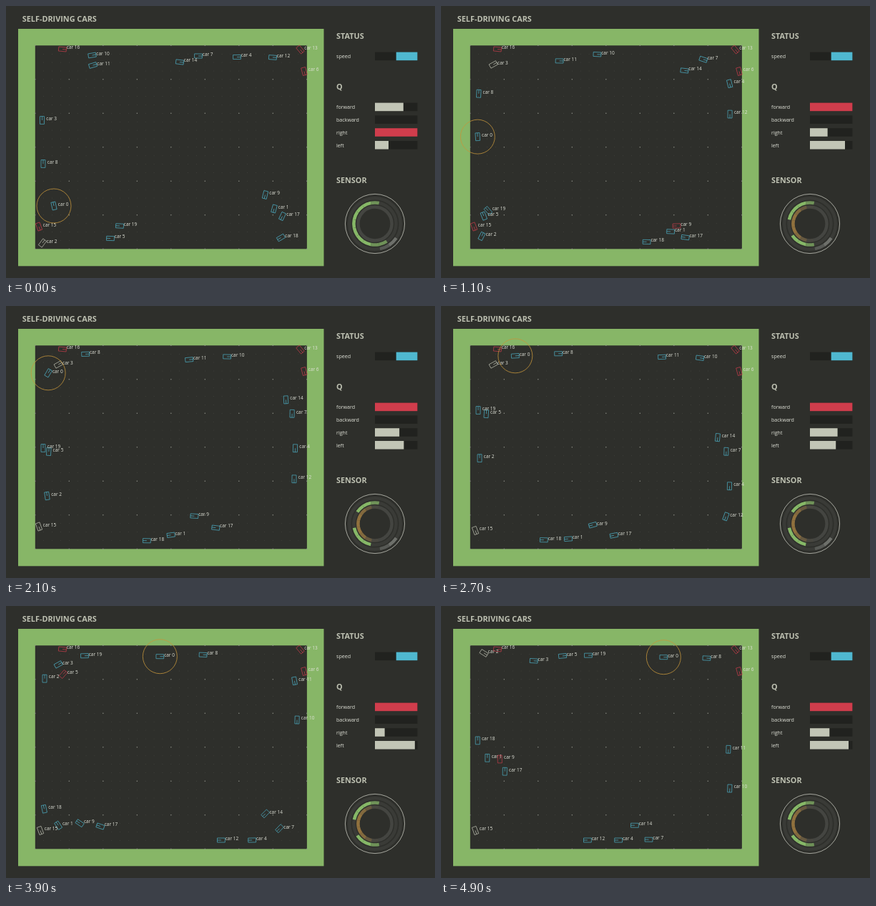
These frames come from a looping animation (600x381 px, 5000 ms). An HTML page:

```html
<!DOCTYPE html>
<html lang="en">
<head>
<meta charset="utf-8">
<title>Self-driving cars</title>
<style>
  html, body { margin: 0; width: 100%; height: 100%; overflow: hidden; background: #2e2f2b; }
  svg { display: block; width: 100vw; height: 100vh; font-family: "Open Sans", "Noto Sans", sans-serif; }
  .head { font-size: 10.85px; font-weight: 700; fill: #bdc0b1; }
  .item { font-size: 7.1px; fill: #e0e2d8; }
  .tag { font-size: 6.5px; fill: #e0e2d8; }
  .car { fill: none; stroke-width: .65; }
</style>
</head>
<body>
<svg viewBox="0 0 600 381">
  <defs id="routes"></defs>
  <rect width="600" height="381" fill="#2e2f2b"/>
  <rect x="17" y="32" width="427.5" height="332.3" fill="#87b667"/>
  <rect x="40.8" y="55.3" width="380.1" height="285" fill="#2e2f2b"/>
  <g id="dots"></g>
  <g id="cars"></g>
  <circle id="focus" r="24" fill="none" stroke="#c4953c" stroke-width=".8"/>
  <g class="head">
    <text x="22.8" y="22">SELF-DRIVING CARS</text>
    <text x="462" y="46">STATUS</text>
    <text x="462" y="117.2">Q</text>
    <text x="462" y="247.6">SENSOR</text>
  </g>
  <g id="bars"></g>
  <g id="sensor" transform="translate(516 305)" fill="none">
    <circle r="41.6" stroke="#c4c6bb" stroke-width=".8"/>
  </g>
</svg>
<script>
const $ = id => document.getElementById(id);
const CYAN = '#4fb8d0', RED = '#d03d4c', WHITE = '#c2c5b6';
const STEP = 100, TICKS = 50, TURN = 60;

function add(parent, tag, attrs, text) {
  const el = document.createElementNS('http://www.w3.org/2000/svg', tag);
  for (const a in attrs) el.setAttribute(a, attrs[a]);
  if (text) el.textContent = text;
  return parent.appendChild(el);
}

// Values at a few ticks, linear in between
const keys = [0, 7, 15, 27, 34, 39, 49];
function at(values, tick) {
  let i = 0;
  while (i < keys.length - 2 && tick >= keys[i + 1]) i++;
  return values[i] + (values[i + 1] - values[i]) * (tick - keys[i]) / (keys[i + 1] - keys[i]);
}
const road = tick => at([0, 60.5, 136, 242, 308, 353.5, 449.5], tick);
const within = (spans, tick) => spans.some((from, i) => i % 2 === 0 && tick >= from && tick < spans[i + 1]);

// Floor grid
for (let i = 0; i <= 32; i++) for (let j = 0; j <= 24; j++) {
  const major = i % 4 === 0 && j % 4 === 0;
  if (!major && (i % 32 === 0 || j % 24 === 0)) continue;
  add($('dots'), 'circle', {
    cx: 40.8 + i * 11.875, cy: 55.3 + j * 11.875,
    r: major ? .75 : .45, fill: major ? '#8f9188' : '#50514b'
  });
}

// Polyline with rounded corners
function rounded(pts) {
  const toward = (p, q, d) => {
    const k = d / Math.hypot(q[0] - p[0], q[1] - p[1]);
    return [p[0] + (q[0] - p[0]) * k, p[1] + (q[1] - p[1]) * k];
  };
  const end = pts.length - 1;
  let d = 'M' + pts[0];
  for (let i = 1; i < end; i++) {
    const room = (j, free) => Math.hypot(pts[j][0] - pts[i][0], pts[j][1] - pts[i][1]) / (free ? 1 : 2);
    const r = Math.min(TURN, room(i - 1, i === 1), room(i + 1, i + 1 === end));
    d += `L${toward(pts[i], pts[i - 1], r)}Q${pts[i]} ${toward(pts[i], pts[i + 1], r)}`;
  }
  return d + 'L' + pts[end];
}

// Every car covers the same road; a stalled one loses the distance of its stall
const cars = [];
function drive(route, { stall = [0, 0], red = [], white = [] } = {}) {
  const path = add($('routes'), 'path', { d: rounded(route.split(' ').map(p => p.split(',').map(Number))) });
  const g = add($('cars'), 'g', {});
  const body = add(g, 'path', { class: 'car', d: 'M-5.4-3H5.4V3H-5.4zM0 0H5.4' });
  const tag = add(g, 'text', { class: 'tag' }, 'car ' + cars.length);
  cars.push({ path, length: path.getTotalLength(), body, tag, stall, red, white });
}
const always = [0, TICKS];
const wreck = { stall: always, red: always };

drive('67,280 49,200 52,69 340,72');
drive('375,284 366,318 280,314 178,328 64,328 65,190', { stall: [7, 10], red: [5, 10] });
drive('51,332 66,312 54,250 54,62 60,66', { stall: [1.3, 14.5], white: [0, 4, 44, 50], red: [4, 11] });
drive('50.5,160 50,72 150,78', { stall: [9.7, 43], white: [10, 31], red: [31, 36] });
drive('323,71.5 407,71 402,328 230,328');
drive('146,325.5 52,322 68,80 190,68', { stall: [32.8, 38.5], red: [32, 42] });
drive('417,91.5 419,99', { stall: always, red: [0, 32, 36, 50] });
drive('269,70 402,72 396,328 270,327');
drive('52,221 53,68 230,66 390,74');
drive('362.5,264.5 352,308 304,308 262,290 190,315 84,312 82,200', { stall: [7, 13.4], red: [5, 12, 46, 50] });
drive('120.5,69 150,64 260,70 410,73 403,280');
drive('121.5,83 149,75 205,80 310,70 406,72 401,230', { stall: [3.1, 9.1] });
drive('373,72 405,74 402,328 190,328');
drive('411.5,61 416.5,67', wreck);
drive('243,78.5 303,86 396,97 374,308 240,307', { stall: [16, 18] });
drive('46,309 48,314.5', { stall: [0, 21], red: [0, 21], white: [21, 50] });
drive('79,60.5 90,61.5', wreck);
drive('386.5,294.5 372,326 331,324 288,306 230,327 88,302 90,190', { stall: [7, 15.3] });
drive('384.5,324.5 372,332 52,326 51,150', { red: [5, 11] });
drive('159,308 52,302 52,70 240,69', { red: [13, 18, 32, 37] });

// Status and Q bars
function bar(name, y) {
  add($('bars'), 'text', { class: 'item', x: 462, y: y + 8.5 }, name);
  add($('bars'), 'rect', { x: 516, y, width: 59.4, height: 11.6, fill: '#21221f' });
  return add($('bars'), 'rect', { x: 516, y, width: 0, height: 11.6, fill: CYAN });
}
const speed = bar('speed', 64.6);
speed.setAttribute('x', 545.7);
speed.setAttribute('width', 29.7);
const [forward, , right, left] = ['forward', 'backward', 'right', 'left'].map((n, i) => bar(n, 135.6 + i * 17.8));
const RANDOM_MOVE = 15;

function drawScores(tick) {
  const q = [
    at([.67, 1, 1, 1, 1, 1, 1], tick),
    at([1, .33, .5, .65, .97, .23, .46], tick),
    at([.32, .9, .75, .61, .06, .94, .91], tick)
  ];
  const top = Math.max(...q);
  [forward, right, left].forEach((el, k) => {
    el.setAttribute('width', tick === RANDOM_MOVE ? 0 : 59.4 * q[k] / top);
    el.setAttribute('fill', q[k] === top ? RED : WHITE);
  });
}

// Sensor: sixteen sectors for traffic, walls and near walls
const point = (r, a) => `${r * Math.cos(a)} ${r * Math.sin(a)}`;
function ring(r, track, ink) {
  add($('sensor'), 'circle', { r, stroke: track, 'stroke-width': 4.5 });
  return Array.from({ length: 16 }, (_, k) => {
    const a = (k - .5) * Math.PI / 8, b = a + Math.PI / 8;
    return add($('sensor'), 'path', {
      d: `M${point(r, a)}A${r} ${r} 0 0 1 ${point(r, b)}`, stroke: ink, 'stroke-width': 4.5
    });
  });
}
const traffic = ring(35.8, '#3a3b37', '#858781');
const wall = ring(29.6, '#3a3b37', '#86b867');
const near = ring(23.6, '#444541', '#a57c3c');

function drawSensor(tick) {
  const alongside = tick >= 4;
  const shift = tick > 20 && tick < 37 ? 1 : 0;
  const show = (cells, level) => cells.forEach((c, k) => c.setAttribute('opacity', level(k)));
  show(traffic, k => tick < 36 && (k === 2 || k === 3) ? (k === 2 ? .7 : .4) : 0);
  show(wall, k => {
    const gap = alongside && k > 6 + shift && k < 9 + shift;
    if (gap || k < (alongside ? 4 + shift : 3) || k > 12) return 0;
    return k < 5 || k === 12 ? .7 : 1;
  });
  show(near, k => alongside ? Math.max(0, Math.min(.8, 1.25 - Math.abs(k - 8) * .3)) : 0);
}

function draw(tick) {
  cars.forEach(({ path, length, body, tag, stall, red, white }, n) => {
    const [from, to] = stall;
    const lost = road(Math.max(from, Math.min(to, tick))) - road(from);
    const s = Math.min(length, road(tick) - lost);
    const { x, y } = path.getPointAtLength(s);
    const a = path.getPointAtLength(Math.max(0, s - 1)), b = path.getPointAtLength(s + 1);
    const h = Math.atan2(b.y - a.y, b.x - a.x) * 180 / Math.PI;
    body.setAttribute('transform', `translate(${x} ${y}) rotate(${h})`);
    body.setAttribute('stroke', within(red, tick) ? RED : within(white, tick) ? WHITE : CYAN);
    tag.setAttribute('x', x + 5.8);
    tag.setAttribute('y', y - .2);
    if (n === 0) $('focus').setAttribute('transform', `translate(${x} ${y})`);
  });
  drawScores(tick);
  drawSensor(tick);
}

const start = performance.now();
let last = -1;
function frame() {
  const tick = Math.floor((performance.now() - start) / STEP) % TICKS;
  if (tick !== last) draw(last = tick);
  requestAnimationFrame(frame);
}
frame();
</script>
</body>
</html>
```
